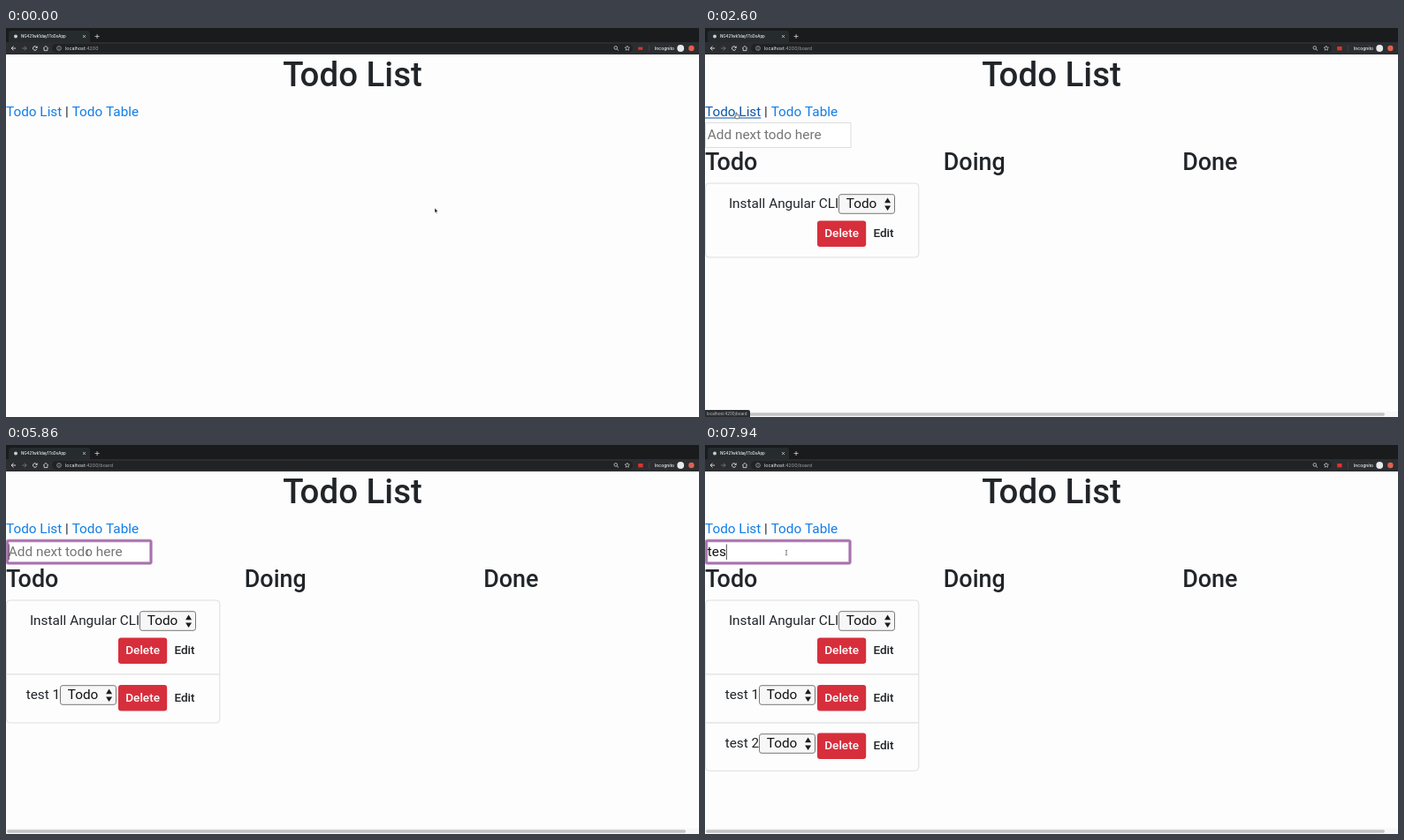
These frames come from a looping animation (784 px wide and 441 px high, 8 s). An HTML page with a canvas:

```html
<!DOCTYPE html>
<html lang="en">
<head>
<meta charset="utf-8">
<title>Todo List</title>
<style>
  html, body { margin: 0; width: 100%; height: 100%; overflow: hidden; background: #fdfdfd; }
  canvas { display: block; width: 784px; height: 441px; }
</style>
</head>
<body>
<canvas id="stage"></canvas>
<script>
const W = 784, H = 441, LOOP = 8000;
const canvas = document.getElementById('stage');
const ratio = window.devicePixelRatio || 1;
canvas.width = W * ratio;
canvas.height = H * ratio;
const ctx = canvas.getContext('2d');

const BODY = 15.35, PAGE = '#fdfdfd', INK = '#212529', ICON = '#e4e5e7';

// Each track lists [start time, ...values]; a value holds until the next entry.
const POINTER = [
  [0, 'arrow', 485, 204], [520, 'arrow', 480.5, 204],
  [910, 'arrow', 448, 190], [1040, 'arrow', 345, 146], [1170, 'arrow', 230, 96],
  [1300, 'arrow', 148, 62], [1430, 'arrow', 108, 49.5], [1560, 'arrow', 86, 60],
  [1690, 'arrow', 47, 83], [1820, 'hand', 42, 93], [1950, 'hand', 38, 95],
  [2080, 'hand', 36, 96], [2340, 'hand', 35, 96],
  [3120, 'hand', 44, 97], [3250, 'beam', 66, 113], [3380, 'beam', 84, 119],
  [3510, 'beam', 91, 121], [3640, 'beam', 92, 122]
];
const TYPED = [
  [0, ''], [4690, 't'], [4820, 'te'], [4950, 'test'], [5210, 'test '], [5340, 'test 1'],
  [5860, ''], [6250, 't'], [6380, 'te'], [6510, 'test'], [6770, 'test '], [7030, 'test 2'],
  [7550, ''], [7810, 't'], [7940, 'tes']
];
const CARET = [[0, false], [3510, true], [4030, false], [4560, true], [7420, false], [7550, true]];
const TODOS = [
  { from: 2600, label: 'Install Angular CLI', top: 176, height: 84, select: 151, button: 218.5 },
  { from: 5860, label: 'test 1', top: 260, height: 55, select: 61, button: 272 },
  { from: 7550, label: 'test 2', top: 315, height: 54.3, select: 61, button: 326.5 }
];

const at = (track, t) => track.filter(entry => entry[0] <= t).pop().slice(1);
const between = (t, from, to) => t >= from && t < to;

function text(str, x, middle, size, { color = INK, weight = 400, family = 'Roboto', align = 'left' } = {}) {
  ctx.font = `${weight} ${size}px ${family}, sans-serif`;
  ctx.textAlign = align;
  ctx.fillStyle = color;
  ctx.fillText(str, x, middle + size * 0.3415);
  return ctx.measureText(str).width;
}

function box(x, y, w, h, radius, fill, stroke, line = 1) {
  ctx.beginPath();
  ctx.roundRect(x, y, w, h, radius);
  paint(fill, stroke, line);
}

function circle(x, y, r, fill, stroke, line) {
  ctx.beginPath();
  ctx.arc(x, y, r, 0, Math.PI * 2);
  paint(fill, stroke, line);
}

function shape(points, fill, stroke, line, open) {
  ctx.beginPath();
  points.forEach(([x, y]) => ctx.lineTo(x, y));
  if (!open) ctx.closePath();
  paint(fill, stroke, line);
}

function paint(fill, stroke, line = 1) {
  if (fill) { ctx.fillStyle = fill; ctx.fill(); }
  if (stroke) { ctx.strokeStyle = stroke; ctx.lineWidth = line; ctx.stroke(); }
}

const stroke = (points, color, line) => shape(points, null, color, line, true);

function navArrow(x, dir, color) {
  stroke([[x - 2.6 * dir, 23], [x + 2.4 * dir, 23]], color, 0.9);
  stroke([[x, 20.6], [x + 2.4 * dir, 23], [x, 25.4]], color, 0.9);
}

function star(x, y) {
  const points = Array.from({ length: 10 }, (_, i) => {
    const angle = i * Math.PI / 5 - Math.PI / 2, r = i % 2 ? 1.3 : 2.8;
    return [x + r * Math.cos(angle), y + r * Math.sin(angle)];
  });
  shape(points, null, ICON, 0.6);
}

function drawBrowser(t, onBoard) {
  const ui = (color = ICON, weight = 400) => ({ color, weight, family: 'Inter' });
  box(0, 0, W, 17, 0, '#191b1d');
  box(3, 3, 92, 14, [3, 3, 0, 0], '#262c2e');
  box(0, 16, W, 14, 0, '#2b2d30');
  box(52, 18, 657, 10, 5, '#202224');

  circle(11, 9.5, 2, '#c9cbcd');
  text('NG421wk1day1ToDoApp', 17, 9.5, 4.4, ui('#eceded', 500));
  stroke([[87, 8], [90, 11]], ICON, 0.7);
  stroke([[90, 8], [87, 11]], ICON, 0.7);
  stroke([[100.6, 9.5], [105.6, 9.5]], ICON, 0.7);
  stroke([[103.1, 7], [103.1, 12]], ICON, 0.7);

  navArrow(8.5, -1, ICON);
  navArrow(20.8, 1, '#77797c');
  ctx.beginPath();
  ctx.arc(32.8, 23, 2.3, 0.4, 5.5);
  paint(null, ICON, 0.9);
  shape([[35.6, 20.2], [35.6, 22.8], [33, 22.8]], ICON);
  stroke([[42, 23.2], [45, 20.4], [48, 23.2]], ICON, 0.8);
  stroke([[43.1, 22.8], [43.1, 25.6], [46.9, 25.6], [46.9, 22.8]], ICON, 0.8);

  circle(60, 23, 2.4, null, '#c6c8ca', 0.6);
  stroke([[60, 22.6], [60, 24.4]], '#c6c8ca', 0.6);
  stroke([[60, 21.4], [60, 22]], '#c6c8ca', 0.6);
  const host = text('localhost', 67, 23, 5.3, ui('#f0f1f2'));
  text(':4200' + (onBoard ? '/board' : ''), 67 + host, 23, 5.3, ui('#a2a5a9'));

  circle(689.8, 22.4, 1.8, null, ICON, 0.7);
  stroke([[691.2, 23.8], [693, 25.6]], ICON, 0.8);
  star(702.8, 23);
  if (t < 130) box(715.2, 21.6, 5, 3.2, 0, '#d8342f');
  else box(715.2, 21, 5.4, 4.4, 0, '#d8342f');
  stroke([[727.5, 19.5], [727.5, 26.5]], '#4a4c4f', 0.6);
  text('Incognito', 734, 23, 4.95, ui('#f0f1f2', 500));
  circle(763.2, 23, 3.9, '#e8e9ea');
  circle(775.4, 23, 3.2, '#e0604f');
}

function drawHeader(hover) {
  text('Todo List', W / 2, 53, 38.4, { weight: 500, align: 'center' });
  const link = { color: '#107de8' };
  const first = text('Todo List', 0, 95, BODY, hover ? { color: '#0b56a8' } : link);
  if (hover) box(0, 101.6, first, 1, 0, '#0b56a8');
  const bar = text(' | ', first, 95, BODY);
  text('Todo Table', first + bar, 95, BODY, link);
}

function drawInput(t) {
  const [typed] = at(TYPED, t), [caret] = at(CARET, t);
  if (t >= 3510) {
    box(1.5, 108.5, 162.5, 25.5, 1.5, '#fff', '#dcc3df', 4);
    box(1.5, 108.5, 162.5, 25.5, 1.5, null, '#a772ad', 2.6);
  } else {
    box(0.5, 107.5, 164.5, 28, 0, '#fff', '#dcdcdc');
  }
  let width = 0;
  if (typed) width = text(typed, 2.8, 121, BODY, { color: '#111' });
  else text('Add next todo here', 2.8, 121, BODY, { color: '#757575' });
  if (caret) box(2.8 + width, 112.5, 0.8, 17.5, 0, '#222');
}

function drawTodo({ label, top, height, select, button }, first, last) {
  const radius = [first ? 4 : 0, first ? 4 : 0, last ? 4 : 0, last ? 4 : 0];
  box(0.5, top, 241.3, height, radius, PAGE, '#dedede');
  const middle = top + 23;
  text(label, select + 0.2, middle, BODY, { align: 'right' });
  box(select + 0.5, middle - 10.3, 63, 21.6, 2.5, '#f7f7f7', '#777');
  text('Todo', select + 8.8, middle, BODY, { color: '#111' });
  const ax = select + 55.6, ay = middle + 0.8;
  for (const dir of [-1, 1]) {
    shape([[ax - 3.5, ay + dir * 1.6], [ax + 3.5, ay + dir * 1.6], [ax, ay + dir * 7.2]], '#1d1d1d');
  }
  box(127, button, 55.2, 29.5, 3.2, '#d72e3c');
  text('Delete', 154.6, button + 14.3, 13.6, { color: '#fff', weight: 500, align: 'center' });
  text('Edit', 202, button + 14.3, 13.6, { weight: 500, align: 'center' });
}

function drawBoard(t) {
  drawInput(t);
  ['Todo', 'Doing', 'Done'].forEach((name, i) => {
    text(name, i * 270.4 - (i ? 0.6 : 0), 151.6, 26.9, { weight: 500 });
  });
  const shown = TODOS.filter(todo => t >= todo.from);
  shown.forEach((todo, i) => drawTodo(todo, i === 0, i === shown.length - 1));
  box(0, 434.5, W, 6.5, 0, '#f7f7f7');
  box(1, 436.2, 768, 3.6, 1.8, '#c2c2c2');
}

function drawPointer(kind, x, y) {
  ctx.save();
  ctx.translate(x, y);
  if (kind === 'arrow') {
    shape([[0, 0], [0, 5.4], [1.2, 4.4], [2, 6.2], [2.9, 5.8], [2.1, 4.1], [3.7, 4]], '#111', '#fff', 0.5);
  } else if (kind === 'hand') {
    shape([[0, 0], [0.9, 0], [1.1, 2.3], [3.8, 2.9], [3.6, 5.6], [3, 6.8], [0, 6.8],
      [-1.7, 4.2], [-1.1, 3.6], [0, 4.2]], '#fff', '#222', 0.6);
  } else {
    stroke([[-1.2, -2.8], [0, -2.3], [1.2, -2.8]], '#444', 0.6);
    stroke([[0, -2.3], [0, 2.5]], '#444', 0.7);
    stroke([[-1.2, 3], [0, 2.5], [1.2, 3]], '#444', 0.6);
  }
  ctx.restore();
}

function draw(t) {
  const onBoard = t >= 2600;
  ctx.setTransform(ratio, 0, 0, ratio, 0, 0);
  box(0, 0, W, H, 0, PAGE);
  drawBrowser(t, onBoard);
  drawHeader(between(t, 1820, 3250));
  if (onBoard) drawBoard(t);
  if (between(t, 1950, 3380)) {
    box(0, 433, 51, 8, [0, 2, 0, 0], '#2b2d30');
    text('localhost:4200/board', 2, 437, 4.47, { color: '#c4c6c8', family: 'Inter' });
  }
  drawPointer(...at(POINTER, t));
}

const start = performance.now();
function tick() {
  draw((performance.now() - start) % LOOP);
  requestAnimationFrame(tick);
}
tick();
</script>
</body>
</html>
```
